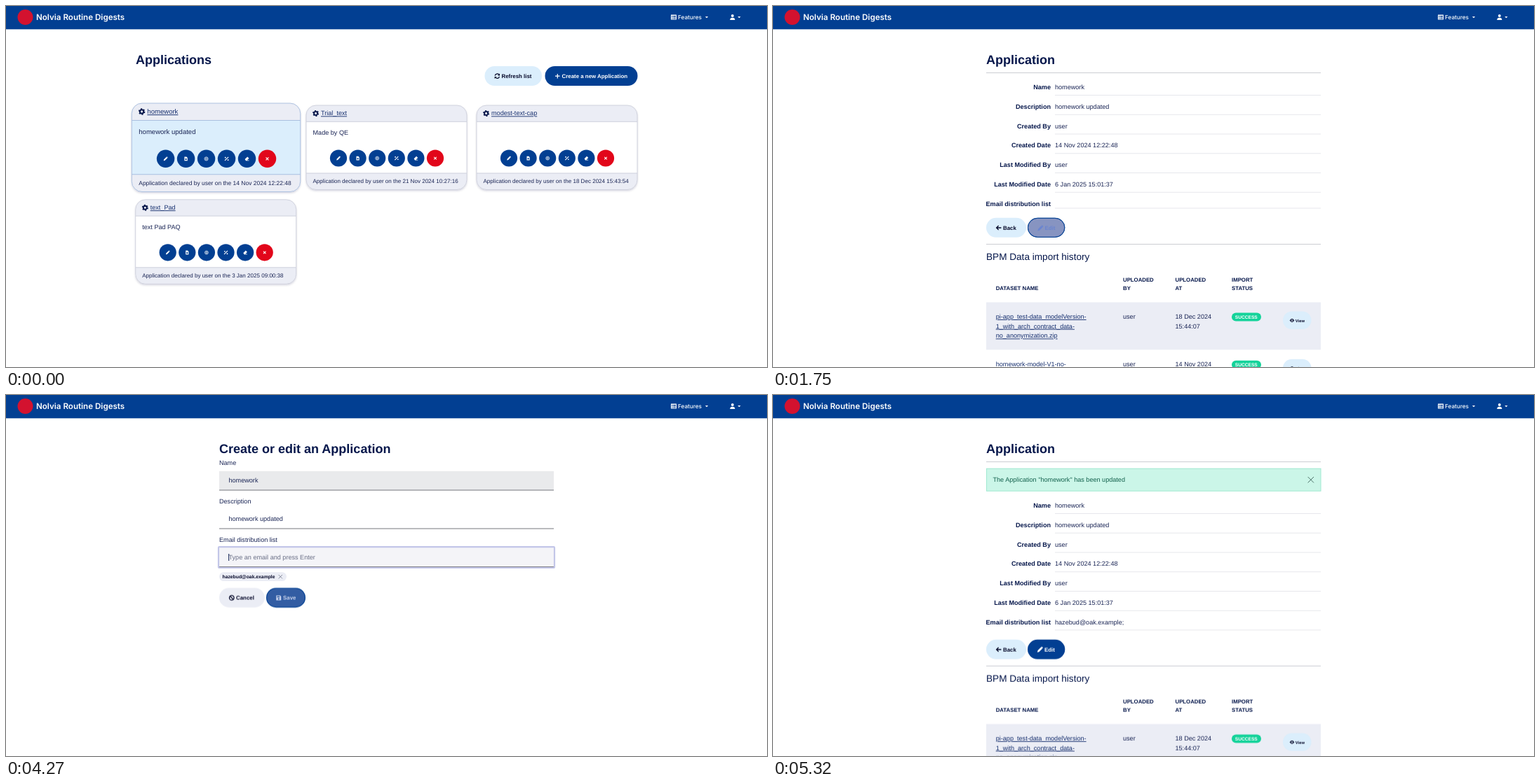
Write an HTML page that moves like this. It is 1085x516 px and loops after 5.74 s.

```html
<!DOCTYPE html>
<html lang="en">
<head>
<meta charset="utf-8">
<title>Application settings</title>
<style>
  html, body { margin: 0; width: 100%; height: 100%; overflow: hidden; background: #fff; }
  svg { display: block; width: 100%; height: 100%; }
  text { font: 9.1px "Liberation Sans", Arial, sans-serif; fill: #1a2555; text-rendering: geometricPrecision; white-space: pre; }
  .h1 { font-size: 18px; font-weight: 700; fill: #06174b; }
  .h2 { font-size: 13.6px; fill: #06174b; }
  .b { font-weight: 700; fill: #06174b; }
  .btn { font-size: 7.9px; font-weight: 700; fill: currentColor; }
  .th { font-size: 7.8px; font-weight: 700; fill: #06174b; }
  .foot { font-size: 8.05px; }
  .link { text-decoration: underline; fill: #17306f; }
  .tag { font-size: 6.6px; font-weight: 700; fill: #fff; }
  .view { font-size: 5.8px; font-weight: 700; fill: #06092a; }
  .chip { font-size: 6.8px; font-weight: 700; fill: #06092a; }
  .hint { fill: #6a6f86; }
  .ok { fill: #12604c; }
  .brand { font: 600 11.6px Inter, sans-serif; fill: #fff; }
  .nav { font: 500 8.2px Inter, sans-serif; fill: #fff; }
  .end { text-anchor: end; }
  .s { fill: none; stroke: currentColor; }
</style>
</head>
<body>
<svg id="stage" viewBox="0 0 1085 516" preserveAspectRatio="none"></svg>
<script>
const LOOP = 5740, STEP = 70;
const BLUE = '#023f92', SKY = '#dbeefc', MIST = '#ebedf5', RED = '#e2061a', INK = '#06092a', NAVY = '#06174b';
const APP = 'homework', MAIL = 'hazebud@oak.example';

// Icons are drawn in a box from -4 to 4 in the current colour.
const ICONS = {
  pencil: '<path d="M-4 4l.7-2.7L1.2-3.2l2 2L-1.3 3.3zM1.9-3.9q.8-.4 1.6.3t.3 1.6l-.5.5-2-2z"/>',
  file: '<path fill-rule="evenodd" d="M-3-4H1L3-2V4H-3zM-1.4-.4V2.2H1.4V-.4z"/>',
  target: '<circle class="s" r="3.5"/><circle class="s" r="1.6" stroke-width="1.2"/>',
  wand: '<path class="s" stroke-width="1.6" d="M-3.5 3.5L3.5-3.5M-3.6-2.4h2.4M-2.4-3.6v2.4M1.6 2.4H4M2.8 1.2V3.6"/>',
  eraser: '<path d="M-4 1L1-4 4-1 0 3H4V4H-2z"/>',
  cross: '<path class="s" stroke-width="1.5" d="M-2.6-2.6L2.6 2.6M2.6-2.6L-2.6 2.6"/>',
  close: '<path class="s" stroke-width=".9" d="M-4-4L4 4M4-4L-4 4"/>',
  plus: '<path class="s" stroke-width="1.2" d="M-3.3 0H3.3M0-3.3V3.3"/>',
  left: '<path class="s" stroke-width="1.3" d="M3.6 0H-3M-.2-3L-3.2 0-.2 3"/>',
  refresh: '<path class="s" stroke-width="1.2" d="M-3.2-.6A3.3 3.3 0 0 1 2.6-2M3.2.6A3.3 3.3 0 0 1-2.6 2"/><path d="M3.7-3.8V-.7H.7zM-3.7 3.8V.7H-.7z"/>',
  ban: '<circle class="s" r="3.3" stroke-width="1.3"/><path class="s" stroke-width="1.3" d="M-2.3-2.3L2.3 2.3"/>',
  disk: '<path fill-rule="evenodd" d="M-3.5-3.5H2L3.5-2V3.5H-3.5zM-2.4-2.5V-.7H1.4V-2.5zM0 .4a1.2 1.2 0 1 0 .01 0z"/>',
  eye: '<path fill-rule="evenodd" d="M-4.2 0Q0-6 4.2 0 0 6-4.2 0zM0-1.9a1.9 1.9 0 1 0 .01 0z"/><circle r="1"/>',
  gear: '<circle class="s" r="2.5" stroke-width="1.9"/><circle class="s" r="3.7" stroke-width="1.6" stroke-dasharray="1.94"/>',
  grid: '<path fill-rule="evenodd" d="M-4-3.5H4V3.5H-4zM-3-2V-1H-1.6V-2zM-.8-2V-1H3V-2zM-3-.3V.7H-1.6V-.3zM-.8-.3V.7H3V-.3zM-3 1.5V2.5H-1.6V1.5zM-.8 1.5V2.5H3V1.5z"/>',
  user: '<circle cy="-2" r="2"/><path d="M-3.6 4Q-3.6.7 0 .7T3.6 4z"/>',
  caret: '<path d="M-2.5-1.3H2.5L0 1.3z"/>'
};

const text = (x, y, s, cls = '') => `<text x="${x}" y="${y}" class="${cls}">${s}</text>`;
const rect = (x, y, w, h, fill, more = '') => `<rect x="${x}" y="${y}" width="${w}" height="${h}" fill="${fill}" ${more}/>`;
const rule = (x1, x2, y, color) => `<path d="M${x1} ${y}H${x2}" stroke="${color}"/>`;
const icon = (name, x, y, k = 1, color = 'inherit') =>
  `<g transform="translate(${x} ${y}) scale(${k})" fill="currentColor" style="color:${color}">${ICONS[name]}</g>`;
const group = (id, body) => `<g id="${id}">${body}</g>`;

function button(x, y, w, name, label, bg, color, more = '') {
  return `<g style="color:${color}">${rect(x, y, w, 28, bg, 'rx="14" ' + more)}` +
    icon(name, x + 17.8, y + 14.2) + text(x + 24, y + 17, label, 'btn') + '</g>';
}

function hoverButton(id, x, y, w, name, label) {
  return button(x, y, w, name, label, BLUE, '#fff') +
    group(id, button(x + .5, y + .5, w - 1, name, label, '#8794c1', '#6a85d0', `stroke="${BLUE}"`)
      .replace('height="28"', 'height="27"'));
}

function card(x, y, title, note, date, hover) {
  const tools = ['pencil', 'file', 'target', 'wand', 'eraser', 'cross'];
  const shape = 'M0 14A14 14 0 0 1 14 0H215A14 14 0 0 1 229 14V106.500A14 14 0 0 1 215 120.500H14A14 14 0 0 1 0 106.500z';
  const edge = hover ? '#a9bfe0' : '#cdd0dc';
  const pose = hover ? 'translate(-5.700 -3) scale(1.050)' : '';
  return `<g transform="translate(${x} ${y}) ${pose}">
    <path d="${shape}" fill="${MIST}" filter="url(#shade)"/>
    ${rect(0, 23.3, 229, 73.7, hover ? SKY : '#fff')}
    ${rule(0, 229, 23.3, edge)}${rule(0, 229, 97, edge)}
    <path d="${shape}" fill="none" stroke="${edge}" stroke-width=".9"/>
    ${icon('gear', 13.6, 11.4, 1, NAVY)}${text(21, 14.4, title, 'link')}${text(9.5, 42, note)}
    ${tools.map((t, i) => `<circle cx="${46 + 27.6 * i}" cy="75.500" r="12.100" fill="${i > 4 ? RED : BLUE}"/>` +
      icon(t, 46 + 27.6 * i, 75.6, .7, '#fff')).join('')}
    ${text(9.5, 111.4, `Application declared by user on the ${date}`, 'foot')}</g>`;
}

function dataRow(y, lines, date, time, bg) {
  return rect(304, y, 477, 68, bg) +
    lines.map((s, i) => text(317.7, y + 23.5 + 13.7 * i, s, 'link')).join('') +
    text(499, y + 23.5, 'user') + text(573.5, y + 23.5, date) + text(573.5, y + 37.2, time) +
    rect(654, y + 15, 42, 12, '#14d39a', 'rx="6"') + text(658.8, y + 23.4, 'SUCCESS', 'tag') +
    rect(727, y + 13, 40.5, 25.5, SKY, 'rx="12.700"') + icon('eye', 740, y + 26, .8, INK) +
    text(744.8, y + 28.1, 'View', 'view');
}

const header = rect(0, 0, 1085, 33.3, BLUE) + '<circle cx="27.500" cy="16" r="11" fill="#d3122f"/>' +
  text(43, 19.8, 'Nolvia Routine Digests', 'brand') + icon('grid', 952, 15.9, 1, '#fff') +
  text(958, 18.8, 'Features', 'nav') + icon('caret', 999, 16.2, .85, '#fff') +
  icon('user', 1035.8, 16, .98, '#fff') + icon('caret', 1045.4, 16.2, .85, '#fff');

const list = text(185, 83, 'Applications', 'h1') +
  button(682.5, 86, 81.5, 'refresh', 'Refresh list', SKY, INK) +
  button(768.5, 86, 132, 'plus', 'Create a new Application', BLUE, '#fff') +
  card(185, 142, APP, APP + ' updated', '14 Nov 2024 12:22:48', true) +
  card(428, 142, 'Trial_text', 'Made by QE', '21 Nov 2024 10:27:16') +
  card(671, 142, 'modest-text-cap', '', '18 Dec 2024 15:43:54') +
  card(184.7, 276.8, 'text_Pad', 'text Pad PAQ', '3 Jan 2025 09:00:38');

const fields = [['Name', APP], ['Description', APP + ' updated'], ['Created By', 'user'],
  ['Created Date', '14 Nov 2024 12:22:48'], ['Last Modified By', 'user'],
  ['Last Modified Date', '6 Jan 2025 15:01:37'], ['Email distribution list', '']];

const table = rect(304, 372, 477, 144, '#fff') +
  text(317.7, 406.3, 'DATASET NAME', 'th') +
  [[499, 'UPLOADED', 'BY'], [573.5, 'UPLOADED', 'AT'], [654, 'IMPORT', 'STATUS']]
    .map(([x, a, b]) => text(x, 394.3, a, 'th') + text(x, 406.3, b, 'th')).join('') +
  dataRow(423.5, ['pi-app_test-data_modelVersion-', '1_with_arch_contract_data-', 'no_anonymization.zip'],
    '18 Dec 2024', '15:44:07', MIST) +
  dataRow(491.7, [APP + '-model-V1-no-'], '14 Nov 2024', '', '#fff');

const details = text(304, 83, 'Application', 'h1') + rule(304, 781, 95.5, '#cbcdd3') +
  group('alert', rect(304.5, 105.2, 476.5, 32, '#cbf6e8', 'stroke="#a0e9d1"') +
    text(313.5, 124, `The Application "${APP}" has been updated`, 'ok') + icon('close', 766.8, 121.2, 1.05, '#466b62')) +
  group('rows', fields.map(([k, v], i) => text(396, 119 + 27.75 * i, k, 'b end') + text(402, 119 + 27.75 * i, v) +
    (i < 6 ? rule(402, 781, 127.5 + 27.75 * i, '#e6e7ec') : '')).join('') +
    group('mail', text(402, 285.5, MAIL + ';'))) +
  group('low', rule(402, 781, 289, '#e6e7ec') +
    button(304, 302.8, 57, 'left', 'Back', SKY, INK) + hoverButton('editHover', 363, 302.8, 53.3, 'pencil', 'Edit') +
    rule(304, 781, 340.5, '#cbcdd3') + text(304, 363.2, 'BPM Data import history', 'h2') +
    rect(304.5, 373.3, 476, 31.5, '#fff', 'stroke="#f1f2f6"') +
    `<g opacity=".8">${text(313.7, 391.6, 'No imported BPM data found')}</g>` + group('table', table));

const caret = (id, x) => group(id, rect(x, 227, 1, 10, NAVY));
const form = text(304, 83, 'Create or edit an Application', 'h1') +
  text(304, 100, 'Name') + rect(304, 108.8, 477, 27.2, '#e9eaec') + text(317.5, 125.2, APP) + rule(304, 781, 136, '#75767d') +
  text(304, 155, 'Description') + text(317.5, 180, APP + ' updated') + rule(304, 781, 191, '#75767d') +
  text(304, 210, 'Email distribution list') +
  group('focus', rect(304, 218, 477, 27.5, '#f4f4f8')) + rule(304, 781, 245.6, '#75767d') +
  group('ring', rect(303, 217.2, 479, 29.8, 'none', 'stroke="#c3c6e8" stroke-width="2.200" rx="1"')) +
  group('hint', text(317.5, 235, 'Type an email and press Enter', 'hint')) +
  group('typed', text(317.5, 235, MAIL)) + caret('caret', 317.2) + caret('caretEnd', 413.6) +
  group('chip', rect(304, 253.2, 96, 12.8, MIST, 'rx="6.400"') + text(308.5, 262.4, MAIL, 'chip') +
    icon('close', 391.3, 259.7, .68, '#50556c')) +
  group('actions', button(304, 255.2, 64.7, 'ban', 'Cancel', MIST, INK) +
    hoverButton('saveHover', 371, 255.2, 56, 'disk', 'Save'));

document.getElementById('stage').innerHTML =
  `<defs><filter id="shade" x="-10%" y="-10%" width="120%" height="125%">
    <feDropShadow dx="0" dy="1.500" stdDeviation="1.500" flood-color="#00133f" flood-opacity=".2"/></filter></defs>` +
  header + group('list', list) + group('details', details) + group('form', form);

const ramp = start => Array.from({ length: 7 }, (_, i) => [start + STEP * i, 1 - (1 - (i + 1) / 7) ** 3]);
const shift = y => `translate(0px, ${y}px)`;

// [time in ms, value]: each value holds until the next time.
const fades = {
  list: [[0, 1], [560, 0]],
  details: [[0, 0], [560, 1], [1820, 0], [5180, 1]],
  form: [[0, 0], [1820, 1], [5180, 0]],
  table: [[0, 0], [700, 1], [5180, 0], [5320, 1]],
  alert: [[0, 0], [5180, .5], [5250, 1]],
  mail: [[0, 0], [1820, 1]],
  editHover: [[0, 0], ...ramp(1330), [1820, 0]],
  saveHover: [[0, 0], [2100, .37], [2170, 0], ...ramp(4270), [5040, .5], [5110, 0]],
  focus: [[0, 0], [2450, 1], [4480, .7], [4550, .35], [4620, 0]],
  ring: [[0, 0], [2520, 1], [4480, .7], [4550, .35], [4620, 0]],
  hint: [[0, 1], [2800, 0], [3290, 1]],
  typed: [[0, 0], [2800, 1], [3290, 0]],
  caret: [[0, 0], [2450, 1], [2800, 0], [3290, 1], [3850, 0], [4270, 1], [4550, 0]],
  caretEnd: [[0, 0], [2800, 1], [3290, 0]],
  chip: [[0, 0], [3290, 1]]
};
const moves = {
  rows: [[0, shift(0)], [1820, shift(42)]],
  low: [[0, shift(0)], [1820, shift(46.8)]],
  actions: [[0, shift(0)], [3290, shift(20.5)]]
};

const begin = document.timeline.currentTime || 0;
function play(id, prop, steps) {
  const frames = steps.map(([t, v]) => ({ offset: t / LOOP, [prop]: v, easing: 'step-end' }));
  frames.push({ offset: 1, [prop]: steps[steps.length - 1][1] });
  const run = document.getElementById(id).animate(frames, { duration: LOOP, iterations: Infinity });
  run.startTime = begin;
}
for (const id in fades) play(id, 'opacity', fades[id]);
for (const id in moves) play(id, 'transform', moves[id]);
</script>
</body>
</html>
```
